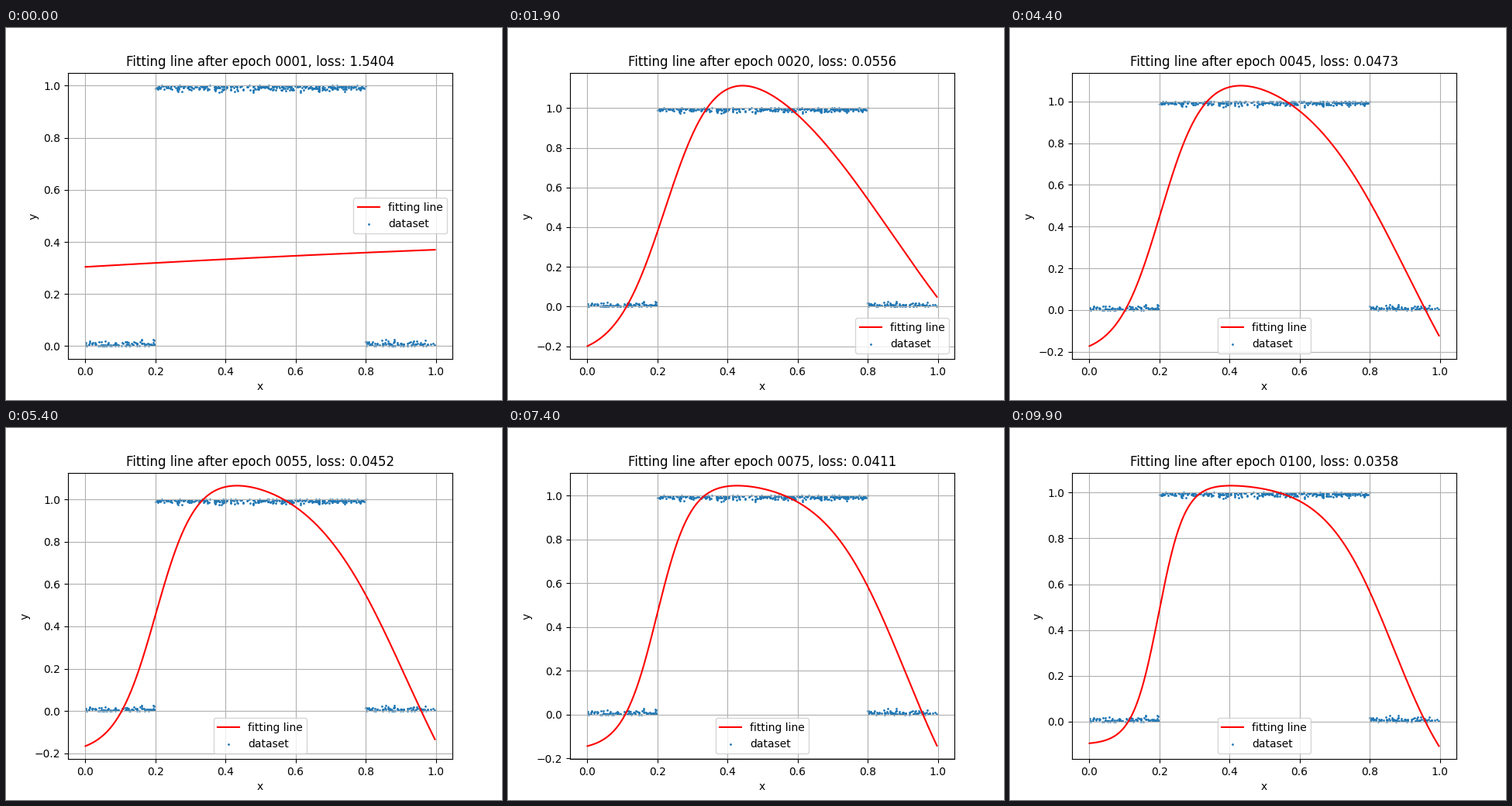
Write a matplotlib script that moves like this. It is 640x480 px and loops after 10 s.

```python
import numpy as np
import matplotlib.pyplot as plt
from matplotlib.animation import FuncAnimation

EPOCHS = 100
INTERVAL = 100
SETTLED = 20  # epoch at which the curve has found its bump
X_MIN, X_MAX = .001, .9975


def sigmoid(z):
    return 1 / (1 + np.exp(-z))


def make_dataset(n=500, seed=3):
    """Noisy box function on [0, 1)."""
    rng = np.random.default_rng(seed)
    x = np.sort(rng.uniform(X_MIN, X_MAX, n))
    x[0], x[-1] = X_MIN, X_MAX
    noise = np.clip(np.abs(rng.normal(0, .01, n)), 0, .026)
    inside = (x > .2) & (x < .8)
    return x, np.where(inside, 1 - noise, noise)


def bump(x, t):
    """A rising and a falling sigmoid that sharpen as t goes from 0 to 1."""
    low = -.24 + .14 * t**1.6
    top = 1.02 + .425 * np.exp(-2.8 * t)
    rise_at = .198 + .027 * np.exp(-4.5 * t)
    rise_width = .073 - .036 * t
    drop = 2.15 - .70 * t**1.7
    fall_at = .868 + .048 * np.sin(np.pi * t)
    fall_width = .07 + .14 * np.exp(-1.7 * t)
    return (low + (top - low) * sigmoid((x - rise_at) / rise_width)
            - drop * sigmoid((x - fall_at) / fall_width))


def fitted(x, epoch):
    if epoch >= SETTLED:
        return bump(x, (epoch - SETTLED) / (EPOCHS - SETTLED))
    # The mean level is learned first, then the bump grows.
    start = .304 + .079 * x - .013 * x**2
    rest = np.exp(-((epoch - 1) / 6)**1.5)
    lift = .25 * rest * (1 - np.exp(1 - epoch))
    end = bump(x, 0)
    return end + (start - end) * rest + lift


def loss_at(epoch):
    """Two fast decays on top of a slow linear descent."""
    n = epoch - 1
    return (.03583 + .000209 * (EPOCHS - epoch)
            + .2135 * np.exp(-.2235 * n) + 1.2704 * np.exp(-3 * n))


data_x, data_y = make_dataset()
line_x = np.linspace(X_MIN, X_MAX, 400)
fig, ax = plt.subplots(figsize=(6.4, 4.8), dpi=100)


def draw(i):
    epoch = i + 1
    ax.clear()
    ax.plot(line_x, fitted(line_x, epoch), color="red", label="fitting line")
    ax.scatter(data_x, data_y, s=1, label="dataset")
    ax.set_title(f"Fitting line after epoch {epoch:04d}, "
                 f"loss: {loss_at(epoch):.4f}")
    ax.set_xlabel("x")
    ax.set_ylabel("y")
    ax.grid(True)
    ax.legend(loc="best")


anim = FuncAnimation(fig, draw, frames=EPOCHS, init_func=lambda: None,
                     interval=INTERVAL, repeat=True)
plt.show()
```
